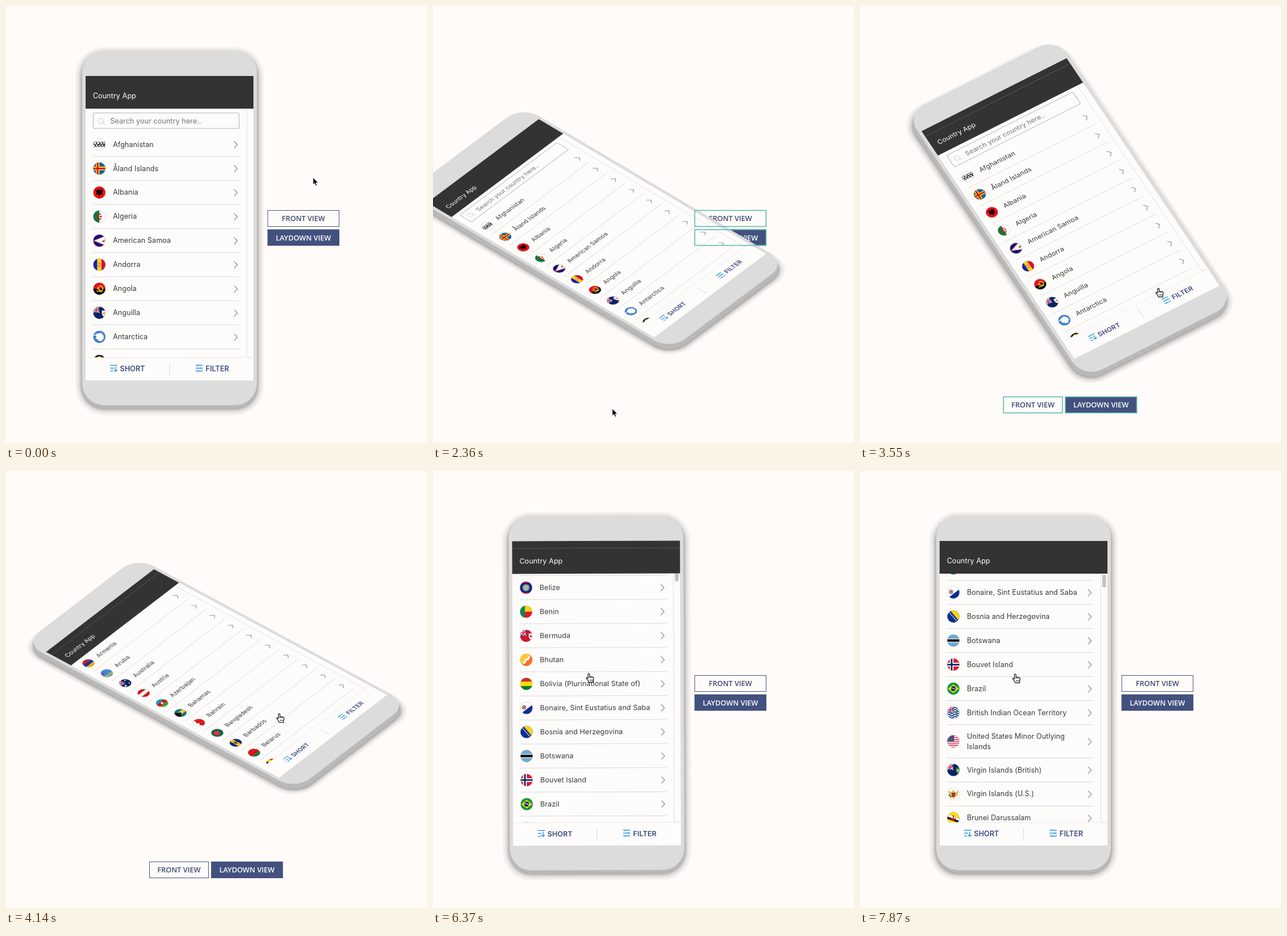
An HTML page that plays this animation: 735x762 px, repeating every 8 s.

```html
<!DOCTYPE html>
<html lang="en">
<head>
<meta charset="utf-8">
<title>Country App</title>
<style>
html, body { margin: 0; width: 100%; height: 100%; overflow: hidden; background: #fffbf8; }
svg { display: block; width: 735px; height: 762px; }
text { font: 12.45px Inter, "Liberation Sans", sans-serif; letter-spacing: .08px; fill: #3a3a3a; }
.btn text { font: 600 12.6px "Open Sans", sans-serif; letter-spacing: 0; text-anchor: middle; fill: #3d4a78; }
.btn.full text { fill: #fff; }
.btn rect { fill: #fffbf8; stroke: #4a5781; }
.btn.full rect { fill: #43517f; stroke: #43517f; }
.tab { font-weight: 600; fill: #3b4a80; }
.line { fill: none; stroke: #dadada; }
.icon { fill: none; stroke: #2a95e6; stroke-width: 1.4; }
.ring { fill: none; stroke: #5fb8b1; stroke-width: 1.6; }
</style>
</head>
<body>
<svg viewBox="0 0 735 762">
  <defs>
    <clipPath id="round"><circle r="10.7"/></clipPath>
    <clipPath id="view"><rect x="139" y="179" width="293" height="434"/></clipPath>
    <filter id="soft" x="-20%" y="-20%" width="140%" height="140%"><feGaussianBlur stdDeviation="4.5"/></filter>
  </defs>
  <g id="buttons"></g>
  <g id="phone">
    <g id="edge"></g>
    <rect x="133" y="78" width="305" height="618" rx="38" fill="#dcdcdc"/>
    <rect x="139" y="122" width="293" height="531" fill="#fefcfa"/>
    <g clip-path="url(#view)">
      <g id="list">
        <rect x="152.5" y="186.5" width="254.5" height="27" rx="2" fill="none" stroke="#c9c9c9" stroke-width="1.6"/>
        <g fill="none" stroke="#cfcfcf" stroke-width="1.2"><circle cx="165.5" cy="200" r="4.6"/><path d="M169 203.5l3 3.2"/></g>
        <text x="182" y="205" style="fill:#757575">Search your country here..</text>
      </g>
      <path class="line" d="M420.5 179V612H428" stroke-width=".8"/>
      <rect id="thumb" x="423" width="6.5" height="22" rx="3.2" fill="#c2c2c2"/>
    </g>
    <rect x="139" y="122" width="293" height="57" fill="#333"/>
    <path id="seam" d="M139 134.5H432" stroke="#666" stroke-width=".7"/>
    <text x="151.7" y="161" style="fill:#fff">Country App</text>
    <path class="line" d="M139 613H432" style="stroke:#ececec"/>
    <path class="line" d="M285.5 622.5V643.5"/>
    <path class="icon" d="M182 626.5H194.5M182 631.5H188.5M182 636.5H187M191.5 629V637M188.5 634.3L191.5 637.3L194.5 634.3"/>
    <path class="icon" d="M331 626.5H334M336 626.5H343.5M331 631.5H339M341 631.5H343.5M331 636.5H334M336 636.5H343.5M335 624.8V628.2M340 629.8V633.2M335 634.8V638.2"/>
    <text class="tab" x="199" y="637">SHORT</text>
    <text class="tab" x="348.5" y="637">FILTER</text>
  </g>
  <g id="rings"></g>
  <g id="cursor">
    <path id="arrow" d="M0 0V12.6L2.9 10L4.9 14.6L7 13.7L5.1 9.3H8.9Z" fill="#000" stroke="#fff" stroke-width=".9"/>
    <g id="hand" fill="#fff" stroke="#000" stroke-width="1.1" stroke-linejoin="round">
      <path d="M-1.3 8.5V1.3Q-1.3 0 0 0T1.3 1.3V5.2L7.2 6.3Q8.7 6.9 8.5 9L7.6 12V15.4H.2L-1.4 12.2L-4.4 8.6Q-4 6.6 -2.6 7.3Z"/>
      <path d="M1.3 5.2V8M3.5 5.6V8M5.7 6V8.2M2.2 10.5V13M4 10.5V13M5.8 10.5V13" stroke-width=".8"/>
    </g>
  </g>
</svg>
<script>
const $ = id => document.getElementById(id);

// Flag pieces, drawn in a 22 x 22 box around the origin
const R = (x, y, w, h, c) => `<rect x="${x}" y="${y}" width="${w}" height="${h}" fill="${c}"/>`;
const C = (x, y, r, c) => `<circle cx="${x}" cy="${y}" r="${r}" fill="${c}"/>`;
const P = (d, c) => `<path d="${d}" fill="${c}"/>`;
const L = (d, c, w, dash = '') => `<path d="${d}" fill="none" stroke="${c}" stroke-width="${w}" stroke-dasharray="${dash}"/>`;
const H = (...cs) => cs.map((c, i) => R(-11, -11 + i * 22 / cs.length, 22, 22 / cs.length + .1, c)).join('');
const V = (...cs) => cs.map((c, i) => R(-11 + i * 22 / cs.length, -11, 22 / cs.length + .1, 22, c)).join('');
const cross = (bg, outer, inner) => H(bg) +
  L('M-3 -11V11M-11 0H11', outer, 6.4) + L('M-3 -11V11M-11 0H11', inner, 2.8);
const jack = R(-11, -11, 11, 11, '#1d2f74') + L('M-11 -11L0 0M0 -11L-11 0', '#fff', 1.3) +
  L('M-5 -11V0M-11 -5H0', '#fff', 2.6) + L('M-5 -11V0M-11 -5H0', '#d0142c', 1.5);
const ensign = (bg, crest = '') => H(bg) + jack + crest;
const shield = (c, d) => P('M4.5 -4H11V3Q9.5 5.5 8 7Q5 5 4.5 2Z', c) + C(8, 1, 2, d);
const navy = '#0b2265', red = '#d7141a', gold = '#fcd20f', green = '#0b7a3b';

const rows = [
  ['Afghanistan', H('#fff') + L('M-11 -4H11M-11 3.6H11', '#222', 1.4, '2 1 1 .8') +
    L('M-10 -1.6L-7 2L-5 -2L-2 2L1 -2L3 2L6 -2L8 2L10 -2', '#111', 1.8, '3 .8')],
  ['Åland Islands', cross('#0a62b0', gold, red)],
  ['Albania', H('#f00f14') + P('M0 -4L3 -7L4 -4L7 -5L5 0L6 4L2 3L0 8L-2 3L-6 4L-5 0L-7 -5L-4 -4L-3 -7Z', '#200')],
  ['Algeria', V(green, '#fff') + L('M3 -3.6A4.4 4.4 0 1 0 3 3.6', red, 1.8) + C(2.6, 0, 1.6, red)],
  ['American Samoa', H('#10107a') + P('M-11 0L11 -9V9Z', '#fff') + L('M11 -8.5L-10 0L11 8.5', '#c22', 1) + P('M4 1L10 -2L8 3Z', '#8b5a2b')],
  ['Andorra', V('#1a1ea6', gold, '#d3103a') + R(-2.5, -3.5, 5, 7, '#d78b45') + R(-1.3, -2, 2.6, 4, '#f2c46a')],
  ['Angola', H('#df1020', '#0a0a0a') + L('M0 -5A5 5 0 0 1 2 5M-5 4L5 5M-4 -1L3 4', gold, 1.6) + C(-1.5, -2, 1.4, gold)],
  ['Anguilla', ensign(navy, shield('#fff', '#f39a2c'))],
  ['Antarctica', H('#3b7fd0') + P('M-7 -4L-3 -6L3 -7L7 -3L8 2L4 7L-1 7L-3 4L-7 3L-5 0Z', '#fff') + L('M-10 -3L-6 -3', '#fff', 1.4)],
  ['Antigua and Barbuda', H('#111', '#0b72c6', '#fff') + C(0, -4, 4.2, gold) + P('M-11 -11L0 11H-11ZM11 -11L0 11H11Z', red)],
  ['Argentina', H('#74acdf', '#fff', '#74acdf') + C(0, 0, 2.4, gold)],
  ['Armenia', H(red, '#1235a0', '#f2a800')],
  ['Aruba', H('#4189dd') + L('M-11 4H11M-11 7H11', gold, 1.4) + C(-5, -4, 2, red)],
  ['Australia', ensign(navy, C(5, -5, 1.3, '#fff') + C(5, 5, 1.3, '#fff') + C(-5, 5, 2, '#fff'))],
  ['Austria', H(red, '#fff', red)],
  ['Azerbaijan', H('#0098c3', red, '#3f9c35') + C(0, 0, 2.4, '#fff')],
  ['Bahamas', H('#00778b', '#ffc72c', '#00778b') + P('M-11 -11L2 0L-11 11Z', '#111')],
  ['Bahrain', V('#fff', red, red) + P('M-4 -11L0 -7L-4 -3L0 1L-4 5L0 9L-4 11Z', '#fff')],
  ['Bangladesh', H('#006a4e') + C(-1, 0, 5.5, '#f42a41')],
  ['Barbados', V('#00267f', '#ffc726', '#00267f') + L('M0 -5V5M-3 -3Q-2 1 0 1Q2 1 3 -3', '#111', 1.2)],
  ['Belarus', H(red, red, green)],
  ['Belgium', V('#111', gold, red)],
  ['Belize', H('#1b1c8a') + R(-11, -11, 22, 2.5, red) + R(-11, 8.5, 22, 2.5, red) + C(0, 0, 6, '#fff') +
    `<circle r="5" fill="#9dc3d8" stroke="#5a9a4a" stroke-width="1.4"/>` + R(-2, -2, 4, 4, '#d9a84c')],
  ['Benin', H(gold, '#e8112d') + R(-11, -11, 9, 22, '#0a8a4a')],
  ['Bermuda', ensign('#cf142b', shield('#fff', '#b8404a'))],
  ['Bhutan', H('#ffc82e') + P('M11 -11V11H-11Z', '#ff6a1f') + L('M-6 6L-2 4L-1 0L3 -1L6 -6', '#fff', 3.4)],
  ['Bolivia (Plurinational State of)', H('#d52b1e', '#f9e300', '#0b7a33')],
  ['Bonaire, Sint Eustatius and Saba', H('#fff') + P('M11 -6V11H-11Z', '#0c2d94') + P('M-11 -11H-3L-11 -5Z', gold) +
    `<circle cx="-4" cy="-1" r="3.3" fill="#fff" stroke="#222" stroke-width=".9"/>` + C(-4, -1, 1.8, red)],
  ['Bosnia and Herzegovina', H('#0b2f8c') + P('M-6 -11H11V9Z', gold) + L('M-10 -10L9 11', '#fff', 1.8, '1.8 1.6')],
  ['Botswana', H('#6da9d2') + R(-11, -3.4, 22, 6.8, '#fff') + R(-11, -2.2, 22, 4.4, '#111')],
  ['Bouvet Island', cross('#e0182d', '#fff', '#0c2a68')],
  ['Brazil', H('#0b9a3c') + P('M-9.5 0L0 -7.5L9.5 0L0 7.5Z', '#fedf00') + C(0, 0, 4.4, '#0b2a7a') + L('M-4 -1Q1 -1.5 4 2', '#fff', 1)],
  ['British Indian Ocean Territory', H('#fff') + [-8, -4, 0, 4, 8].map(y =>
    L(`M-11 ${y}q2.75 -3 5.5 0t5.5 0t5.5 0t5.5 0`, '#1d3f91', 2)).join('') + jack + R(5, -4, 2, 7, '#3b7a3d')],
  ['United States Minor Outlying|Islands', H(...Array.from({ length: 13 }, (_, i) => i % 2 ? '#fff' : '#c93048')) +
    R(-11, -11, 12, 11.8, '#3c3b6e') + L('M-9 -7H0M-9 -4H0M-9 -1H0', '#fff', .9, '.9 1.4')],
  ['Virgin Islands (British)', ensign(navy, shield('#1f8a4c', '#e8d27a'))],
  ['Virgin Islands (U.S.)', H('#fff') + P('M-9 -6L-3 -3L0 -8L3 -3L9 -6L7 3L3 5L0 9L-3 5L-7 3Z', '#e8b93a') +
    R(-3, -2, 6, 7, '#c9303d') + R(-3, -2, 6, 2.2, '#2a4aa0') + L('M-8 1L-4 6', green, 1.8)],
  ['Brunei Darussalam', H('#f7e017') + P('M-11 -7L11 1V9L-11 1Z', '#111') + P('M-11 -7L11 1V5L-11 -3Z', '#fff') +
    L('M0 -5V5M-4 0Q0 6 4 0', red, 1.8)],
];

function buildList() {
  let y = 220.4, out = '';
  for (const [name, flag] of rows) {
    const lines = name.split('|');
    const h = 41.94 + (lines.length - 1) * 16, mid = y + h / 2;
    out += `<g transform="translate(163 ${mid})"><g clip-path="url(#round)">${flag}</g>
      <circle r="10.7" fill="none" stroke="#bbb" stroke-width=".5"/></g>`;
    lines.forEach((s, i) => {
      out += `<text x="186.7" y="${mid + 4.2 + (i - (lines.length - 1) / 2) * 18}">${s}</text>`;
    });
    out += `<path d="M398.3 ${mid - 5.5}l5.6 6l-5.6 6" fill="none" stroke="#a0a0a0" stroke-width="1.5"/>
      <path class="line" d="M151.5 ${y + h}H408"/>`;
    y += h;
  }
  $('list').innerHTML += out;
}

// Button boxes for the front and the laid layout
const boxes = {
  front: [[457, 356.5, 124.5, 28], [457, 390, 124.5, 27.5]],
  laid: [[250.5, 681.5, 103, 28], [358.5, 681.5, 124.5, 28]],
};
const rect = (b, cls = '') => `<rect class="${cls}" x="${b[0]}" y="${b[1]}" width="${b[2]}" height="${b[3]}"/>`;
const drawButtons = set => set.map((b, i) => `<g class="btn ${i ? 'full' : ''}">${rect(b)}
  <text x="${b[0] + b[2] / 2}" y="${b[1] + 18.8}">${i ? 'LAYDOWN VIEW' : 'FRONT VIEW'}</text></g>`).join('');

const smooth = u => u * u * (3 - 2 * u);
function track(keys, t) {
  let i = keys.findIndex(k => k[0] > t);
  if (i < 0) return keys[keys.length - 1].slice(1);
  if (i === 0) return keys[0].slice(1);
  const a = keys[i - 1], b = keys[i], u = smooth((t - a[0]) / (b[0] - a[0]));
  return a.slice(1).map((v, j) => v + (b[j + 1] - v) * u);
}

// CSS "ease": cubic-bezier(.25, .1, .25, 1)
function ease(x) {
  if (x >= 1) return 1;
  let lo = 0, hi = 1;
  for (let i = 0; i < 24; i++) {
    const s = (lo + hi) / 2;
    if (.75 * s * (1 - s) + s ** 3 < x) lo = s; else hi = s;
  }
  return .3 * lo * (1 - lo) ** 2 + 3 * lo * lo * (1 - lo) + lo ** 3;
}

const LOOP = 8000, STEP = 148.15, TURN = 460;
const clicks = [1112, 2347, 3395, 5948];   // alternately lay down and stand up
const scrollKeys = [[3700, 0], [4300, 600], [4880, 961], [6400, 961], [6850, 1040], [7150, 1040], [7850, 1162]];
const cursorKeys = [
  [0, 536, 299], [260, 546, 385], [520, 530, 468], [880, 517, 402], [1340, 517, 402],
  [2080, 311, 698], [2370, 313, 702], [3250, 519, 402], [3400, 519, 402], [3556, 521, 492],
  [3800, 480, 420], [4750, 470, 430], [5037, 413.5, 653], [5330, 300, 703], [5900, 304, 698],
  [6370, 272, 353], [6700, 271, 354],
];
const handTimes = [[700, 1112], [1950, 2347], [3200, 4900], [5200, 5948], [6200, 8000]];

let layout = '';
function render(t) {
  const n = clicks.filter(c => c <= t).length, laid = n % 2 === 1;
  const since = n ? t - clicks[n - 1] : Infinity;
  const e = ease(since / TURN), p = laid ? e : 1 - e;

  const name = laid ? 'laid' : 'front';
  if (name !== layout) {
    layout = name;
    $('buttons').innerHTML = drawButtons(boxes[name]);
    $('rings').innerHTML = boxes[name].map(b => rect(b, 'ring')).join('');
  }
  $('rings').style.display = since < 300 ? '' : 'none';

  // rotateX(a) rotateZ(-a) without perspective
  const a = p * 50 * Math.PI / 180, c = Math.cos(a), s = Math.sin(a);
  const [cx, cy] = laid ? [367.5, 353] : [285.5, 387.5];
  $('phone').setAttribute('transform',
    `translate(${cx} ${cy}) matrix(${c} ${-s * c} ${s} ${c * c} 0 0) translate(-285.5 -387.5)`);

  const dx = -10 * p, dy = 5 + 5 * p;
  const body = (k, grow, extra) => `<rect x="${133 + dx * k - grow}" y="${78 + dy * k - grow}"
    width="${305 + 2 * grow}" height="${618 + 2 * grow}" rx="${38 + grow}" ${extra}/>`;
  $('edge').innerHTML = body(1.1, 12, 'fill="#000" opacity=".035"') +
    body(1.1, 2, 'fill="#000" opacity=".42" filter="url(#soft)"') +
    [1, .75, .5, .25].map(k => body(k, 0, 'fill="#b9b9b9"')).join('');

  const [scroll] = track(scrollKeys, t);
  $('list').setAttribute('transform', `translate(0 ${-scroll})`);
  $('thumb').setAttribute('y', 123.5 + scroll * .0495);
  $('seam').style.display = t > clicks[2] && t < clicks[3] + TURN ? '' : 'none';

  const [x, y] = track(cursorKeys, t);
  const hand = handTimes.some(([from, to]) => t >= from && t < to);
  $('cursor').setAttribute('transform', `translate(${x} ${y})`);
  $('arrow').style.display = hand ? 'none' : '';
  $('hand').style.display = hand ? '' : 'none';
}

// Each picture is held for one step
function frame() {
  const t = performance.now() % LOOP;
  render(Math.floor(t / STEP + .09) * STEP);
  requestAnimationFrame(frame);
}

buildList();
frame();
</script>
</body>
</html>
```
